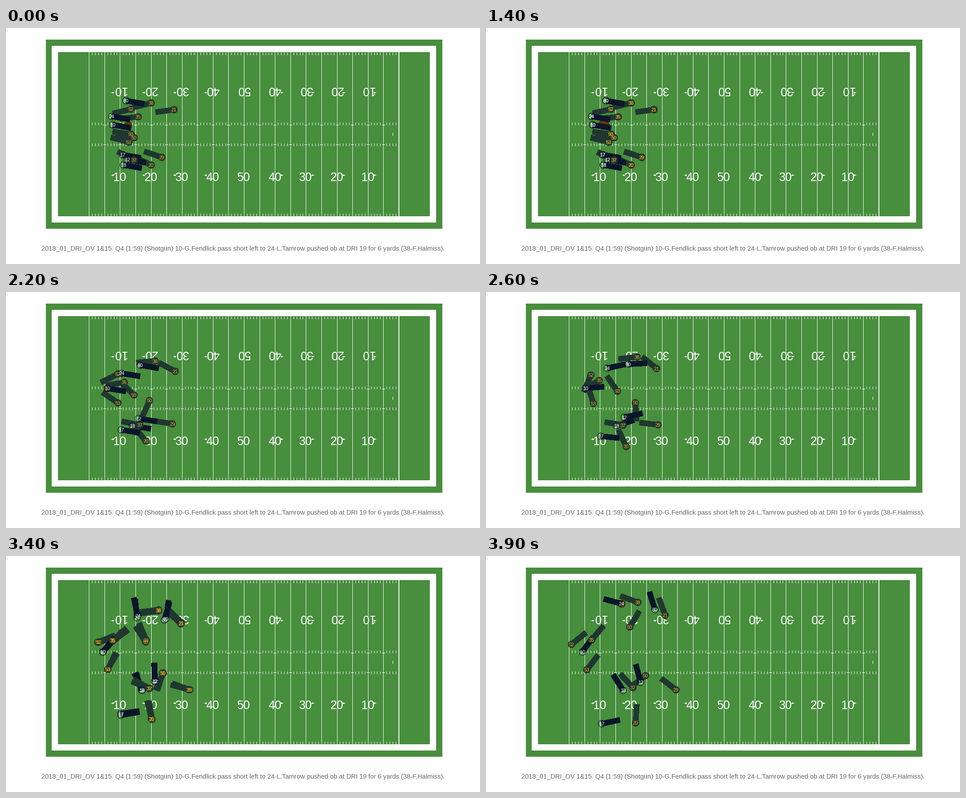
Animation of 1058 by 529 pixels, one loop 4.4 s. Source, as a matplotlib script:

```python
import numpy as np
import matplotlib.pyplot as plt
from matplotlib.animation import FuncAnimation
from matplotlib.patches import Circle, Polygon, Rectangle

W, H, DPI = 1058, 529, 100
PT = 72 / DPI  # points per pixel
TURF, NAVY, PINE, GOLD, BROWN = "#478e3d", "#0b162a", "#203731", "#ffb612", "#663300"
LEFT, TOP, YARD = 116.2, 53.5, 6.917
BOTTOM = TOP + 53.33 * YARD
MIDDLE = 237.5

plt.rcParams["font.family"] = "Liberation Sans"
fig = plt.figure(figsize=(W / DPI, H / DPI), dpi=DPI, facecolor="white")
ax = fig.add_axes([0, 0, 1, 1])
ax.set_xlim(0, W)
ax.set_ylim(H, 0)
ax.axis("off")


def label(x, baseline, text, size, color, angle=0, ha="center", z=2):
    return ax.text(x, baseline, text, fontsize=size * PT, color=color, ha=ha,
                   va="baseline", rotation=angle, rotation_mode="anchor", zorder=z)


def yard_x(yard):
    """Centre of the pixel column that holds a yard line."""
    return np.floor(LEFT - 0.7 + YARD * np.asarray(yard)) + 0.5


def vlines(x, y0, y1, width=1):
    ax.vlines(x, y0, y1, color="white", lw=width * PT, antialiased=False, zorder=1)


def draw_field():
    for margin, color in ((4, TURF), (2, "white"), (0, TURF)):
        pad = margin * YARD
        ax.add_patch(Rectangle((LEFT - pad, TOP - pad), 120 * YARD + 2 * pad,
                               BOTTOM - TOP + 2 * pad, fc=color, lw=0,
                               antialiased=False, zorder=0))

    lines = yard_x(range(10, 111, 5))
    vlines(lines, TOP, BOTTOM)
    vlines([lines[-1] + 0.5], TOP, BOTTOM, 2)
    ticks = yard_x([y for y in range(11, 110) if y % 5])
    for y0, y1 in ((55, 60), (212, 217), (259, 264), (416, 421)):
        vlines(ticks, y0, y1)
    for y in (216.5, 260.5):
        ax.hlines([y] * 19, lines[1:-1] - 3, lines[1:-1] + 3, color="white",
                  lw=PT, antialiased=False, zorder=1)
    vlines(yard_x([108]), 235, 241)

    for yard in range(20, 101, 10):
        x = LEFT - 0.5 + yard * YARD
        number = str(50 - abs(60 - yard))
        label(x, 343, number, 26.5, "white")
        label(x, 2 * MIDDLE - 343, number, 26.5, "white", 180)
        if yard != 60:
            side = -1 if yard < 60 else 1
            for y in (330, 2 * MIDDLE - 330):
                ax.add_patch(Polygon([(x + side * 20, y), (x + side * 13.5, y - 2),
                                      (x + side * 13.5, y + 2)], fc="white", lw=0, zorder=2))


draw_field()
label(79, 499, "2018_01_DRI_OV 1&15: Q4 (1:59) (Shotgun) 10-G.Fendlick pass short left to "
      "24-L.Tamrow pushed ob at DRI 19 for 6 yards (38-F.Halmiss).",
      14.53, "#666666", ha="left")

# Time is counted in tracking samples; everyone breaks just after the snap.
SAMPLES, STEPS, LEAD = 44, 34, 6
BREAK, LAST = 12, SAMPLES - 1
SNAP_SPOT = np.array([273, 217])
CATCH_SPOT = np.array([297, 102])


def ramp(t, start, end):
    return np.clip((t - start) / (end - start), 0, 1)


def ease(t, start, end):
    u = ramp(t, start, end)
    return u * u * (3 - 2 * u)


def angle_to(p, target):
    return np.degrees(np.arctan2(*(target - p)[::-1]))


class Player:
    """Runs from start to end.

    burst: speed lost on the way (negative: gained), bow: sideways bend in
    pixels, lean: degrees by which the body is turned off the point it watches.
    """

    def __init__(self, number, defends, start, end, burst=0, bow=0, lean=0):
        self.number, self.defends = str(number), defends
        self.start, self.run = np.array(start), np.subtract(end, start)
        self.burst, self.bow, self.lean = burst, bow, lean

    def position(self, t):
        u = ramp(t, BREAK, LAST)
        u += self.burst * u * (1 - u)
        normal = np.array([-self.run[1], self.run[0]]) / np.hypot(*self.run)
        return self.start + self.run * u + normal * self.bow * np.sin(np.pi * u)

    def heading(self, t):
        p = self.position(t)
        if self.defends:
            # Defenders read the backfield first, then follow the ball.
            settled = ease(t, BREAK, 26)
            watch = ball(t) - np.array([140 * (1 - settled), 0])
            return angle_to(p, watch) + self.lean * settled
        # The offence faces downfield, then turns to where the pass goes.
        turned = ease(t, 20, 40)
        return 10 * (1 - turned) + (angle_to(p, CATCH_SPOT) + self.lean) * turned


passer = Player(10, False, (238, 217), (215, 215), burst=1)
receiver = Player(24, False, (236, 198), (303, 107), burst=-0.3, bow=13, lean=-25)
players = [
    Player(18, False, (262, 307), (306, 301), burst=0.9, bow=-4, lean=-30),
    Player(38, True, (324, 168), (339, 104), burst=-0.3, bow=8, lean=25),
    Player(21, True, (375, 183), (400, 133), burst=-0.9, lean=55),
    Player(52, True, (279, 182), (191, 198), burst=0.2, bow=4),
    Player(35, True, (295, 199), (236, 188), burst=1, bow=-9),
    Player(93, True, (279, 238), (321, 159), burst=-0.9, bow=8, lean=50),
    Player(50, True, (286, 246), (356, 268), burst=0.7, bow=-13, lean=-110),
    Player(53, True, (274, 256), (225, 255), burst=1, bow=7, lean=10),
    Player(29, True, (348, 290), (424, 300), burst=0.1, bow=3, lean=-20),
    Player(20, True, (324, 307), (334, 374), burst=0.4, bow=17, lean=10),
    Player(37, True, (286, 296), (328, 295), burst=0.1, bow=3, lean=-35),
    Player(80, False, (268, 163), (377, 120), burst=-0.2, bow=18, lean=60),
    receiver,
    passer,
    Player(17, False, (260, 284), (258, 376), burst=-0.1, bow=3, lean=70),
    Player(12, False, (271, 295), (345, 283), burst=0.3, bow=-8),
]


def ball(t):
    held = passer.position(t)
    spot = SNAP_SPOT + (held - SNAP_SPOT) * ramp(t, 9.5, 13)
    return spot + (receiver.position(t) - spot) * ramp(t, 33, 40.5)


def bar(p, heading, color, z):
    a = np.radians(heading)
    along = 41.5 * np.array([np.cos(a), np.sin(a)])
    side = 5.8 * np.array([-np.sin(a), np.cos(a)])
    return Polygon([p - side, p + side, p + along + side, p + along - side],
                   fc=color, lw=0, antialiased=False, zorder=z)


moving = []


def draw_player(player, t, z):
    color = PINE if player.defends else NAVY
    p = player.position(t)
    if player.defends:
        dot = Circle(p, 8.2, fc=color, lw=0, zorder=5)
    else:
        dot = Circle(p, 7.7, fc="none", ec=color, lw=PT, zorder=5)
    moving.append(ax.add_patch(bar(p, player.heading(t), color, z)))
    moving.append(ax.add_patch(dot))
    moving.append(label(p[0], p[1] + 4, player.number, 11,
                        GOLD if player.defends else "white", z=6))


def update(frame):
    while moving:
        moving.pop().remove()
    step = min(max(frame - LEAD, 0), STEPS - 1)
    # Some steps hold two samples, which are drawn over each other.
    samples = [s for s in range(SAMPLES) if round(s * (STEPS - 1) / LAST) == step]
    for t in samples:
        moving.append(ax.add_patch(Circle(ball(t), 8.2, fc=BROWN, lw=0, zorder=3)))
    for order, player in enumerate(players):
        for t in samples:
            draw_player(player, t, 4 + order / 100)
    return moving


animation = FuncAnimation(fig, update, frames=44, interval=100, repeat=True)
plt.show()
```
